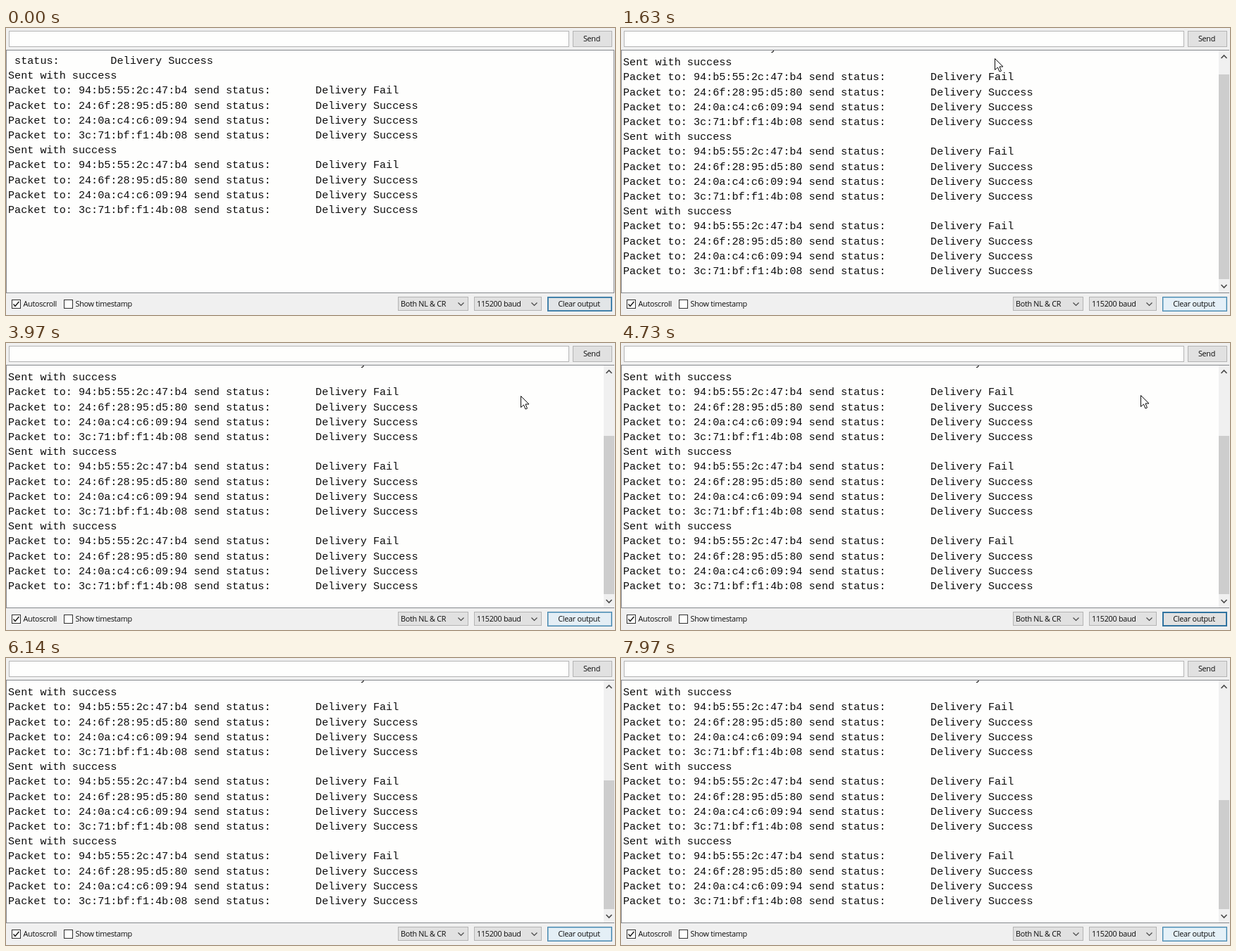
Recreate the animation shown at these times as an HTML page with a canvas. Size 864 px wide and 408 px high, loop 8 s.

```html
<!DOCTYPE html>
<html>
<head>
<meta charset="utf-8">
<style>
  html, body { margin: 0; height: 100%; overflow: hidden; background: #f0f0f0; }
  canvas { display: block; }
</style>
</head>
<body>
<canvas id="stage" width="864" height="408"></canvas>
<script>
const ctx = document.getElementById('stage').getContext('2d');
const LOOP = 8000, PITCH = 21.2, FIRST_BLOCK = 1280, BLOCK_EVERY = 2000;
const PANEL = '#f0f0f0', PAPER = '#fefefd', FACE = '#e1e1e1', EDGE = '#b4b4b4', INK = '#0c0c0c';
const MONO = '15.15px "Liberation Mono", monospace';
const LABEL = '10.8px "Open Sans", sans-serif';

const GAP = ' '.repeat(7);
const packet = (mac, result) => `Packet to: ${mac} send status:${GAP}Delivery ${result}`;
const BLOCK = [
  'Sent with success',
  packet('94:b5:55:2c:47:b4', 'Fail'),
  packet('24:6f:28:95:d5:80', 'Success'),
  packet('24:0a:c4:c6:09:94', 'Success'),
  packet('3c:71:bf:f1:4b:08', 'Success')
];
const lineText = i => i ? BLOCK[(i - 1) % 5] : ' status:        Delivery Success';

// Pointer positions as [time, x, y]; outside this span it is off stage.
const POINTER = [[1330, 486, -20], [1630, 530, 43], [2150, 730, 75],
                 [4600, 730, 75], [4730, 737, 74], [4940, 790, -20]];

function box(x, y, w, h, fill, edge, weight = 1) {
  ctx.fillStyle = edge;
  ctx.fillRect(x, y, w, h);
  ctx.fillStyle = fill;
  ctx.fillRect(x + weight, y + weight, w - 2 * weight, h - 2 * weight);
}

function path(points, color, weight) {
  ctx.beginPath();
  points.forEach(([x, y]) => ctx.lineTo(x, y));
  ctx.strokeStyle = color;
  ctx.lineWidth = weight;
  ctx.stroke();
}

function label(text, x, y, align = 'left') {
  ctx.font = LABEL;
  ctx.letterSpacing = '-0.28px';
  ctx.textAlign = align;
  ctx.fillStyle = INK;
  ctx.fillText(text, x, y);
}

// dir is 1 for pointing down, -1 for up.
function chevron(x, y, dir, weight) {
  path([[x - 4, y - 2 * dir], [x, y + 2 * dir], [x + 4, y - 2 * dir]], '#484848', weight);
}

function checkbox(x, text, checked) {
  box(x, 386, 13, 13, PAPER, '#303030');
  if (checked) path([[x + 2.5, 392.5], [x + 5, 395.5], [x + 10.5, 389]], INK, 1.3);
  label(text, x + 16.5, 396);
}

function dropdown(x, w, text) {
  box(x, 382, w, 20, FACE, EDGE);
  label(text, x + 4, 396);
  chevron(x + w - 10.5, 392.5, 1, 1.2);
}

const mix = (a, b, k) => `rgb(${a.map((v, i) => Math.round(v + (b[i] - v) * k))})`;

function drawLog(count) {
  const scroll = Math.max(0, 46 + (count - 1) * PITCH - 345);
  box(0, 31, 863, 346, PAPER, '#85878c');
  ctx.save();
  ctx.beginPath();
  ctx.rect(1, 32, 847, 344);
  ctx.clip();
  ctx.font = MONO;
  ctx.letterSpacing = '0px';
  ctx.textAlign = 'left';
  ctx.fillStyle = INK;
  for (let i = 0; i < count; i++) {
    const y = Math.round(51 + i * PITCH - scroll);
    if (y > 20) ctx.fillText(lineText(i), 3, y);
  }
  ctx.restore();

  if (scroll) {
    const thumb = Math.round(307 * 341.5 / ((count + 1) * PITCH));
    ctx.fillStyle = PANEL;
    ctx.fillRect(848, 32, 15, 344);
    ctx.fillStyle = '#cdcdcd';
    ctx.fillRect(848, 357 - thumb, 15, thumb);
    chevron(855.5, 41, -1, 1.6);
    chevron(855.5, 367, 1, 1.6);
  }
}

function drawControls(t) {
  box(4, 4, 795, 23, PAPER, EDGE);
  box(804, 4, 56, 23, FACE, EDGE);
  label('Send', 831, 19, 'center');

  checkbox(8, 'Autoscroll', true);
  checkbox(82, 'Show timestamp', false);
  dropdown(556, 100, 'Both NL & CR');
  dropdown(664, 96, '115200 baud');

  // The default button slowly pulses between its grey and pale blue faces.
  const glow = 0.5 + 0.5 * Math.cos(2 * Math.PI * (t - 1480) / 2200);
  const border = [48, 115, 160];
  const face = mix([225, 225, 225], [229, 241, 249], glow);
  box(768, 382, 92, 21, face, mix(border, [70, 135, 175], glow));
  box(769, 383, 90, 19, face, mix(border, [170, 205, 225], glow));
  label('Clear output', 813, 396, 'center');
}

function drawPointer(t) {
  const next = POINTER.findIndex(p => p[0] > t);
  if (next < 1) return;
  const [t0, x0, y0] = POINTER[next - 1], [t1, x1, y1] = POINTER[next];
  const k = (t - t0) / (t1 - t0);
  ctx.save();
  ctx.translate(Math.round(x0 + (x1 - x0) * k) + 0.5, Math.round(y0 + (y1 - y0) * k) + 0.5);
  const arrow = new Path2D('M0 0V16L4 12.5L6.5 18.5L9 17.5L6.5 11.5H11.5Z');
  ctx.fillStyle = '#fff';
  ctx.fill(arrow);
  ctx.strokeStyle = INK;
  ctx.lineWidth = 1;
  ctx.stroke(arrow);
  ctx.restore();
}

function draw() {
  const t = performance.now() % LOOP;
  const blocks = Math.max(0, Math.floor((t - FIRST_BLOCK) / BLOCK_EVERY) + 1);
  ctx.fillStyle = PANEL;
  ctx.fillRect(0, 0, 864, 408);
  drawLog(11 + 5 * blocks);
  drawControls(t);
  drawPointer(t);
  requestAnimationFrame(draw);
}
draw();
</script>
</body>
</html>
```
